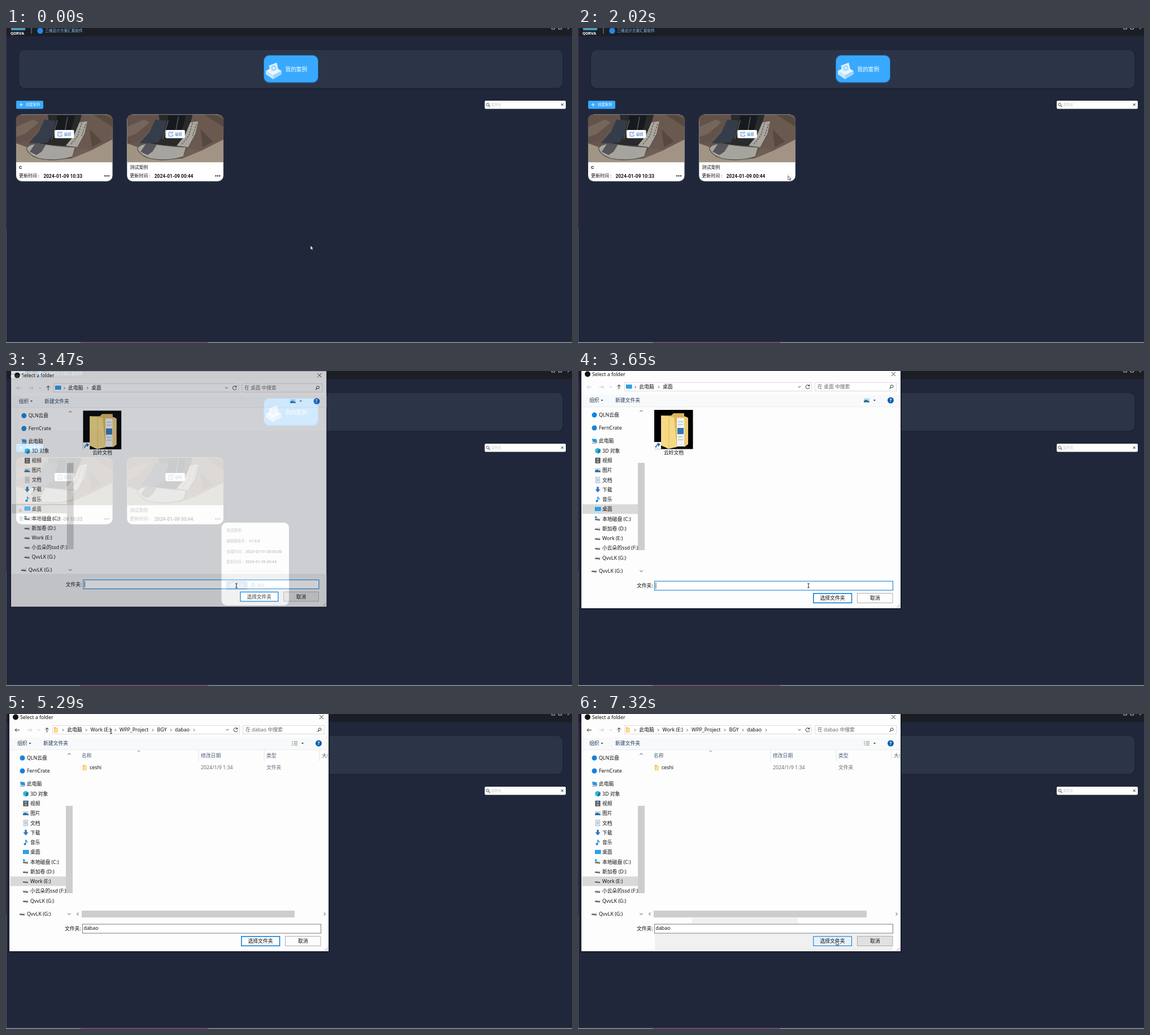
An HTML page for the animation above (8 s loop, 1002 px wide and 559 px high).

```html
<!DOCTYPE html>
<html lang="zh-CN">
<head>
<meta charset="utf-8">
<title>案例发布</title>
<style>
html, body { margin: 0; width: 100%; height: 100%; overflow: hidden; background: #21273a; }
svg { display: block; font-family: "Noto Sans", "Noto Sans CJK SC", sans-serif; white-space: pre; }
.app { font-family: Roboto, "Noto Sans CJK SC", sans-serif; }
</style>
</head>
<body>
<svg id="stage" width="1002" height="559" viewBox="0 0 1002 559"></svg>
<script>
const LOOP = 8000, BLUE = '#0078d7', SKY = '#38a9ff';

// Drawing helpers; text is placed by its vertical centre.
const rect = (x, y, w, h, fill, more = '') =>
  `<rect x="${x}" y="${y}" width="${w}" height="${h}" fill="${fill}" ${more}/>`;
const dot = (x, y, r, fill) => `<circle cx="${x}" cy="${y}" r="${r}" fill="${fill}"/>`;
const shape = (d, fill, more = '') => `<path d="${d}" fill="${fill}" ${more}/>`;
const line = (d, stroke, width = 1, more = '') => shape(d, 'none', `stroke="${stroke}" stroke-width="${width}" ${more}`);
const text = (x, y, str, size = 8.8, fill = '#111', more = '') =>
  `<text x="${x}" y="${y + size * .37}" font-size="${size}" fill="${fill}" ${more}>${str}</text>`;
const group = (id, ...parts) => `<g id="${id}">${parts.join('')}</g>`;
const at = (x, y, ...parts) => `<g transform="translate(${x} ${y})">${parts.join('')}</g>`;
const border = (color, width = 1) => `stroke="${color}" stroke-width="${width}"`;
const BOLD = 'font-weight="700"', MEDIUM = 'font-weight="500"', MIDDLE = 'text-anchor="middle"';

const chevron = (x, y, dir, color = '#444', r = 2.6) => {
  const d = { right: `M${-r / 2} ${-r}L${r / 2} 0L${-r / 2} ${r}`, left: `M${r / 2} ${-r}L${-r / 2} 0L${r / 2} ${r}`,
    up: `M${-r} ${r / 2}L0 ${-r / 2}L${r} ${r / 2}`, down: `M${-r} ${-r / 2}L0 ${r / 2}L${r} ${-r / 2}` }[dir];
  return at(x, y, line(d, color));
};
const triangle = (x, y) => shape(`M${x - 2} ${y - 1}h4l-2 2.4z`, '#333');
const magnifier = (x, y, flip, color) =>
  `<g transform="translate(${x} ${y}) scale(${flip} 1)">` +
  `<circle cx="-.7" cy="-.7" r="2.4" fill="none" ${border(color)}/>${line('M1.1 1.1L3.4 3.4', color, 1.2)}</g>`;
const arrow = (x, y, angle, color) =>
  `<g transform="translate(${x} ${y}) rotate(${angle})">${line('M-4 0H4M.8 -3.2L4 0L.8 3.2', color)}</g>`;
const folder = (x, y) => at(x, y, shape('M0 -4.5h3l1 1.2h3v8h-7z', '#e6b84b'), rect(.8, -2.6, 6.2, 7, '#ffe08a'));

// Home page
const photo = [
  rect(0, 0, 171, 85, '#67574e'),
  shape('M0 0H60L46 20L22 46L0 52Z', '#62524a'),
  shape('M0 22L30 9L40 14L16 34L0 40Z', '#75655b'),
  shape('M56 0H116L112 16L102 40L88 56L40 53L60 34Z', '#292a2a'),
  shape('M50 9L70 11L63 38L55 50L22 51L40 31Z', '#353d4b'),
  shape('M73 2H104L99 22L91 40L67 42Z', '#161a1e'),
  line('M73 10L63 44M91 4L84 42', '#55534e', 1.6),
  shape('M112 14L126 12L121 34L108 58L88 55L102 38Z', '#a9a69f'),
  line('M116 15L109 38L97 53M123 17L116 38', '#55524d', 1.3, 'stroke-dasharray="3 2"'),
  shape('M116 0H171V48L134 64L108 62L121 36L126 13Z', '#69594f'),
  shape('M136 0L171 22V8L156 0ZM130 26L152 48L134 58Z', '#574840'),
  shape('M0 51L19 58L30 75L58 81L98 78L134 63L171 44V85H0Z', '#a19484'),
  shape('M98 78L134 63L108 60Z', '#6e6054'),
  shape('M18 60Q24 50 45 52Q75 57 104 58L99 75Q70 84 40 78Q22 72 18 60Z', '#a6a49e'),
  shape('M34 51L53 53L45 66L36 72L24 66Z', '#55555a'),
  line('M18 60Q24 50 45 52Q75 57 104 58M18 60Q22 72 40 78Q70 84 99 75', '#4d4a46', 1.1)
].join('');

const pencil = (x, y) => at(x, y,
  line('M4 -3.5H-3.5V3.5H3.5V0M-.5 .7L4 -3.8', '#4687cf', 1));

const card = (x, title, date, id) => at(x, 153.5,
  rect(-1, -.5, 172.5, 120.5, '#2b3347', 'rx="11"'),
  rect(0, 0, 170.5, 118.5, '#fff', 'rx="10"'),
  `<g clip-path="url(#photoClip)">${photo}</g>`,
  rect(68, 27.5, 34.5, 14.5, '#fff', 'rx="2"'), pencil(77.5, 35), text(84.5, 35, '编辑', 6.4, '#3a7fc8', MEDIUM),
  text(5, 94, title, 8, '#111', BOLD.replace('700', title.length > 1 ? '500' : '700')),
  text(5, 109, '更新时间 :', 8, '#111', MEDIUM), text(48.5, 109, date, 8.4, '#111', BOLD),
  group(id, ...[157.2, 160.6, 164].map(cx => dot(cx, 109, 1.15, '#111'))));

const home = `<g class="app">` + [
  rect(0, 0, 1002, 559, '#21273a'),
  rect(0, 0, 1002, 14.5, '#1b1e25'),
  rect(0, 0, 1, 356, '#55265b'), rect(0, 356, 1, 203, '#555967'),
  rect(0, 557.5, 1002, 1.5, '#9699a1'), rect(132, 557.5, 226, 1.5, '#75426f'),
  rect(9, -21, 25, 25, '#4d9ac5'), text(8, 9, 'QORVA', 7.3, '#fff', BOLD),
  rect(44.5, 0, 1, 10, '#8b8e95'), dot(60.5, 5, 5.2, '#2687ed'),
  text(69, 5, '三维设计方案汇报软件', 6.7, '#8cc8f4', MEDIUM),
  line('M966 0V2H971.5V0M978 0V2H983.5V0M994 2L997 0', '#d5d7da', .9),
  rect(21.5, 38, 965.5, 71, '#1d2334', 'rx="12"'),
  rect(23, 39, 962.5, 67.5, '#2b3547', 'rx="10"'),
  rect(456, 48, 97, 49.5, '#256eb2', 'rx="10"'), rect(457, 49, 95, 47, SKY, 'rx="9"'),
  shape('M460 76L474 69L488 76L473 84Z', '#e9f6ff'),
  shape('M460 76L473 84V91L460 82Z', '#c9e8ff'), shape('M488 76L473 84V91L488 82Z', '#9ed5ff'),
  shape('M466 67L479 62L482 75L469 80Z', '#d4edff', border('#fff', .7)),
  `<circle cx="474" cy="71" r="3.5" fill="none" ${border('#79c3fb', 1.3)}/>`,
  text(494.5, 73.5, '我的案例', 9.7, '#fff', MEDIUM),
  rect(18, 129, 48, 14.5, SKY, 'rx="2"'), line('M23.5 136H30M26.7 132.7V139.3', '#fff', .9),
  text(35, 136, '创建案例', 6.3, '#fff', MEDIUM),
  rect(847.5, 129, 143.5, 14.5, '#fff', 'rx="2"'), magnifier(853.5, 136.5, 1, '#555'),
  text(859, 136, '案例名', 6, '#c9c9c9'), line('M982.7 134L986.7 138M986.7 134L982.7 138', '#222'),
  card(18, 'C', '2024-01-09 10:33', 'dotsA'),
  card(214.3, '测试案例', '2024-01-09 00:44', 'dotsB'),
  group('dotsHover', rect(370.5, 258.5, 8.5, 7.5, 'none', border('#c8c8c8', .6) + ' stroke-dasharray="1.5 1"')),
  group('popup',
    rect(380, 268.5, 122, 149, '#161c2b', 'rx="11" opacity=".6"'),
    rect(381.5, 269, 119.5, 147, '#fff', 'rx="9"'),
    text(390, 283, '测试案例', 6.7, '#111', MEDIUM),
    text(390, 302, '编辑器版本 :', 6.5, '#111', MEDIUM), text(430.5, 302, 'v1.0.0', 6.7, '#111', BOLD),
    text(390, 320.7, '创建时间 :', 6.7, '#111', MEDIUM), text(424, 320.7, '2023-07-01 00:00:00', 6.7, '#111', BOLD),
    text(390, 339, '更新时间 :', 6.7, '#111', MEDIUM), text(424, 339, '2024-01-09 00:44', 6.7, '#111', BOLD),
    rect(390, 355, 99, .8, '#bfc3c9'),
    rect(390, 372.8, 37, 15.2, '#fff', `id="publish" rx="2" ${border('#6ea5dc', .8)}`),
    `<g id="publishInk">`, line('M396 380.5L403.5 376.5L401.5 384L399.3 381.8ZM399.3 381.8L403.5 376.5', 'currentColor', .9),
    text(407.5, 380.2, '发布', 6.6, 'currentColor'), `</g>`,
    rect(428, 372.8, 36.5, 15.2, '#fff', `rx="2" ${border('#a9d4f8', .8)}`),
    line('M433.5 378H441M435.5 378V376.5H439V378M434.5 378V384H440V378M436.4 379.5V382.5M438.2 379.5V382.5', '#3f91dc', .9),
    text(445, 380.2, '删除', 6.6, '#3f91dc'))
].join('') + `</g>`;

// Folder dialog
const screen = at(0, 0, rect(-5, -3.8, 10.5, 7, '#1687dc'), rect(-4, -2.8, 8.5, 5, '#27a3f2'));
const drive = shape('M-5 0L-3 -1.5H5L4 1Z', '#d9d9d9') + shape('M-5 0L4 1V3L-5 2Z', '#555');
const icons = {
  cloud: dot(0, 0, 4.5, '#1683dc'),
  pc: shape('M-4 -4L4 -3L5 3L-3 2Z', '#2e94d8') + line('M-4 4H4', '#777'),
  cube: shape('M0 -5L4.5 -3V3L0 5L-4.5 3V-3Z', '#35b6d5') + shape('M0 -1L4.5 -3V3L0 5Z', '#147e9f'),
  film: rect(-4.5, -5, 9, 10, '#404a58') + rect(-2.5, -4, 5, 3.5, '#58a4de') + rect(-2.5, .5, 5, 3.5, '#c58f52'),
  picture: rect(-5, -3.5, 10, 7, '#b8d9ef') + shape('M-5 3.5V1L-1 -1L5 2V3.5Z', '#2b678e'),
  page: rect(-3.5, -5, 7, 10, '#f4f4f4', border('#8397a9', .7)) + line('M-2 -2H2M-2 0H2M-2 2H2', '#5d98c9', .8),
  down: shape('M-1.8 -5H1.8V-.5H4.5L0 5L-4.5 -.5H-1.8Z', '#2879c6'),
  note: dot(-1.5, 3, 2, '#1688d9') + line('M0 3V-4.5Q1 -2 3.5 0', '#1688d9', 1.3),
  screen, drive,
  system: drive + rect(-5, -4.5, 3.5, 3.5, '#16a5e8')
};
const places = [['cloud', 'QLN云盘', 78, 0], ['cloud', 'FernCrate', 101, 0], ['pc', '此电脑', 124, 0],
  ...[['cube', '3D 对象'], ['film', '视频'], ['picture', '图片'], ['page', '文档'], ['down', '下载'], ['note', '音乐'],
    ['screen', '桌面'], ['system', '本地磁盘 (C:)'], ['drive', '新加卷 (D:)'], ['drive', 'Work (E:)'],
    ['drive', '小云朵的ssd (F:)'], ['drive', 'QvvLK (G:)']].map(([icon, name], i) => [icon, name, 141.5 + i * 17.27, 6]),
  ['drive', 'QvvLK (G:)', 354.5, 0]];
const sidebar = places.map(([icon, name, y, indent]) =>
  at(29 + indent, y, icons[icon]) + text(37 + indent, y, name)).join('');

const crumbs = list => list.map(([x, name, next]) => text(x, 28, name) + chevron(next, 28.5, 'right', '#444', 2)).join('');
const box = (x, y, w, h, color, more = '') => rect(x + .5, y + .5, w - 1, h - 1, '#fff', border(color) + more);

const dialog = group('dialog',
  rect(4, -4, 569, 427.5, '#111624', 'opacity=".55" rx="2"'),
  rect(6, -2, 565, 423, '#fdfdfd'), rect(6, 42, 565, 21, '#f8f9fa'), rect(6, 63, 565, 1, '#ececec'),
  group('footer', rect(6, 362, 565, 59, '#eeeeee')),
  group('trail', rect(202, 362, 187, 10, '#f0f0f0'), rect(136, 390, 421, 30, '#f0f0f0')),
  dot(17, 5.5, 5, '#111'), text(25, 5.5, 'Select a folder'),
  line('M555 2L562 9M562 2L555 9', '#222', .9),
  arrow(20, 28.5, 180, 'currentColor'), arrow(41.5, 28.5, 0, '#c8c8c8'), chevron(58, 28.5, 'down', '#aaa', 1.7), arrow(72.5, 28.5, -90, '#333'),
  box(82, 20, 332, 16, '#dcdcdc'),
  group('refresh', line('M409.2 25.8A3.5 3.5 0 1 0 410 29M409.7 24V26.6H407', '#333')),
  box(419, 20, 145, 16, '#dcdcdc'), magnifier(555, 28, -1, '#333'),
  text(20, 52, '组织', 8.8, '#1e395b'), triangle(42.5, 52), text(66, 52, '新建文件夹', 8.8, '#1e395b'),
  triangle(525, 52), dot(553.5, 52, 5.5, '#0c5db2'), text(553.5, 52, '?', 8, '#fff', `${BOLD} ${MIDDLE}`),
  rect(7, 236.5, 99, 17, '#d9d9d9', 'id="selected"'), sidebar,
  rect(106, 163, 12, 155, '#cdcdcd'), chevron(112, 71, 'up'), chevron(112, 355, 'down'),
  group('desktop',
    group('deskCrumbs', crumbs([[108.5, '此电脑', 143]]), chevron(101.5, 28.5, 'right', '#444', 2), text(150, 28, '桌面')),
    group('editBar', rect(399, 20, 16, 17, '#fdfdfd'), box(82, 20, 317, 16, BLUE), arrow(406.5, 28, 0, '#333')),
    group('picked', rect(97.5, 23, 18.5, 11, BLUE), text(98, 28, '桌面', 8.8, '#fff')),
    group('typed', text(97.5, 28, 'E:\\WPP_Project\\BGY\\dabao'), rect(210, 23, .8, 10, '#111')),
    at(90, 28, screen), chevron(392, 28, 'down', '#444', 2.3),
    text(424, 28, '在 桌面 中搜索', 8.8, '#666'), at(511, 52, icons.picture),
    rect(135, 69, 68.5, 69.5, '#000'),
    shape('M147 79H165L169 75H188V132L160 137L147 132Z', '#dcb65b'),
    rect(175, 83, 13, 51, '#f0f2f3'), line('M177 90H186M177 95H186M177 117H186M177 122H186', '#9aa9b6', 1),
    rect(176, 101, 11, 11, '#2f79b5'), shape('M188 80L195 83V130L188 135Z', '#edcc75'),
    shape('M147 79L170 82L175 135L160 138L147 132Z', '#f5d983'), line('M161 82V136', '#dfbd65'),
    rect(135, 126, 12, 12.5, '#fff'), line('M138 136Q137 131 144 130M140.5 128L144.5 130L142 133.5', '#1b62a7', 1.7),
    text(169.5, 144.5, '云岭文档', 8.8, '#111', MIDDLE)),
  group('target',
    folder(85, 28), chevron(101, 28.5, 'right', '#444', 2),
    crumbs([[108.5, '此电脑', 142], [149.5, 'Work (E:)', 193.5], [201, 'WPP_Project', 260], [267.5, 'BGY', 292], [299, 'dabao', 333]]),
    chevron(392, 28, 'down', '#444', 2.3), text(424, 28, '在 dabao 中搜索', 8.8, '#666'),
    line('M506 49H508M506 52H508M506 55H508M509.5 49H516M509.5 52H516M509.5 55H516', '#777'),
    ...[[134, '名称'], [345, '修改日期'], [461, '类型']].map(([x, s]) => text(x, 73.5, s, 8.8, '#4c607a')),
    `<g clip-path="url(#listClip)">${text(559, 73.5, '大小', 8.8, '#4c607a')}</g>`,
    ...[340.5, 456.5, 554.5].map(x => rect(x, 64, 1, 20, '#e5e5e5')), chevron(235, 66, 'up', '#777', 2.3),
    rect(131, 87, 440, 16, '#e5f3ff', 'id="rowHover"'),
    folder(136, 95), text(148, 95, 'ceshi'), text(345, 95, '2024/1/9 1:34', 8.8, '#6d6d6d'), text(461, 95, '文件夹', 8.8, '#6d6d6d'),
    chevron(127, 355, 'left'), chevron(564, 355, 'right'), rect(134, 349, 377, 12, '#cdcdcd')),
  text(104, 381, '文件夹:'), box(135, 372.5, 423, 17, '#7a7a7a', ' id="field"'),
  group('caret', rect(137.5, 375.5, .8, 11, '#111')), group('fieldText', text(137.5, 380, 'dabao')),
  rect(416.8, 394.8, 67.7, 16.6, '#fdfdfd', `id="choose" ${border(BLUE, 1.5)}`), text(450.5, 403, '选择文件夹', 8.8, '#111', MIDDLE),
  rect(494.5, 394.5, 62.5, 17, '#fdfdfd', `id="cancel" ${border('#adadad')}`), text(525.7, 403, '取消', 8.8, '#111', MIDDLE),
  line('M564 420L570 414M567 420L570 417', '#aaa'));

const pointer = group('pointer',
  group('hand', shape('M0 0V7.6L1.8 6L3 8.6L4.2 8.1L3.1 5.6H5.3Z', '#fff', border('#222', .7))),
  group('beam', line('M-1.7 -3.7H1.7M0 -3.7V3.7M-1.7 3.7H1.7', '#222')));

const stage = document.getElementById('stage');
stage.innerHTML = `<defs><clipPath id="photoClip"><path d="M0 85V10Q0 0 10 0H160.5Q170.5 0 170.5 10V85Z"/></clipPath>
  <clipPath id="listClip"><rect x="555" y="64" width="16" height="20"/></clipPath></defs>` + home + dialog + pointer;

const moves = [[0, 539, 386], [170, 505, 361], [350, 425, 305], [540, 340, 247], [720, 305, 223], [900, 330, 240],
  [1090, 354, 255], [1270, 361, 258], [1450, 366, 260], [1640, 370, 261], [2020, 372, 262],
  [2740, 377, 277], [2920, 391, 320], [3110, 404, 362], [3290, 408, 381],
  [3830, 360, 310], [4010, 270, 160], [4180, 205, 52], [4360, 186, 31],
  [5660, 186, 43], [5840, 184, 70], [6050, 182.5, 89], [6220, 190, 129],
  [6400, 240, 190], [6580, 330, 290], [6770, 410, 375], [6950, 450, 420], [7130, 458, 408], [7320, 457, 403]];

const $ = id => document.getElementById(id);
const show = (id, on) => { $(id).style.display = on ? '' : 'none'; };
const paint = (id, name, value) => $(id).setAttribute(name, value);

function render(t) {
  const [, x, y] = moves.findLast(m => m[0] <= t);
  const during = (a, b) => t >= a && t < b;
  const opening = during(3470, 3650), moved = t >= 5290, editing = during(4360, 5290);
  const overPublish = t >= 3290, overChoose = t >= 7130;

  show('dotsHover', during(2020, 2380));
  show('dotsB', !during(2020, 2380));
  show('popup', t >= 2380);
  paint('publish', 'fill', overPublish ? '#7fa9d6' : '#fff');
  paint('publishInk', 'color', overPublish ? '#fff' : '#3f91dc');

  show('dialog', t >= 3470);
  paint('dialog', 'opacity', opening ? .78 : 1);
  paint('dialog', 'transform', opening ? 'translate(3.1 2.2) scale(.988)' : '');
  paint('dialog', 'color', moved ? '#333' : '#c8c8c8');
  show('footer', opening);
  show('trail', overChoose);
  show('desktop', !moved);
  show('target', moved);
  show('refresh', !editing);
  show('deskCrumbs', !editing);
  show('editBar', editing);
  show('picked', during(4360, 4550));
  show('typed', during(4550, 5290));
  show('rowHover', moved && y > 86 && y < 103);
  paint('selected', 'y', moved ? 288.3 : 236.5);
  paint('field', 'stroke', t < 4550 ? BLUE : '#7a7a7a');
  show('caret', t < 4360);
  show('fieldText', moved);
  paint('choose', 'fill', overChoose ? '#e5f1fb' : '#fdfdfd');
  paint('choose', 'stroke-width', overChoose ? 1 : 1.5);
  paint('cancel', 'fill', opening || overChoose ? '#e1e1e1' : '#fdfdfd');

  const beam = during(3470, 3830) || during(4360, 5660);
  show('beam', beam);
  show('hand', !beam);
  paint('pointer', 'transform', `translate(${x} ${y})`);
}

function tick() {
  render(performance.now() % LOOP);
  requestAnimationFrame(tick);
}
tick();
</script>
</body>
</html>
```
